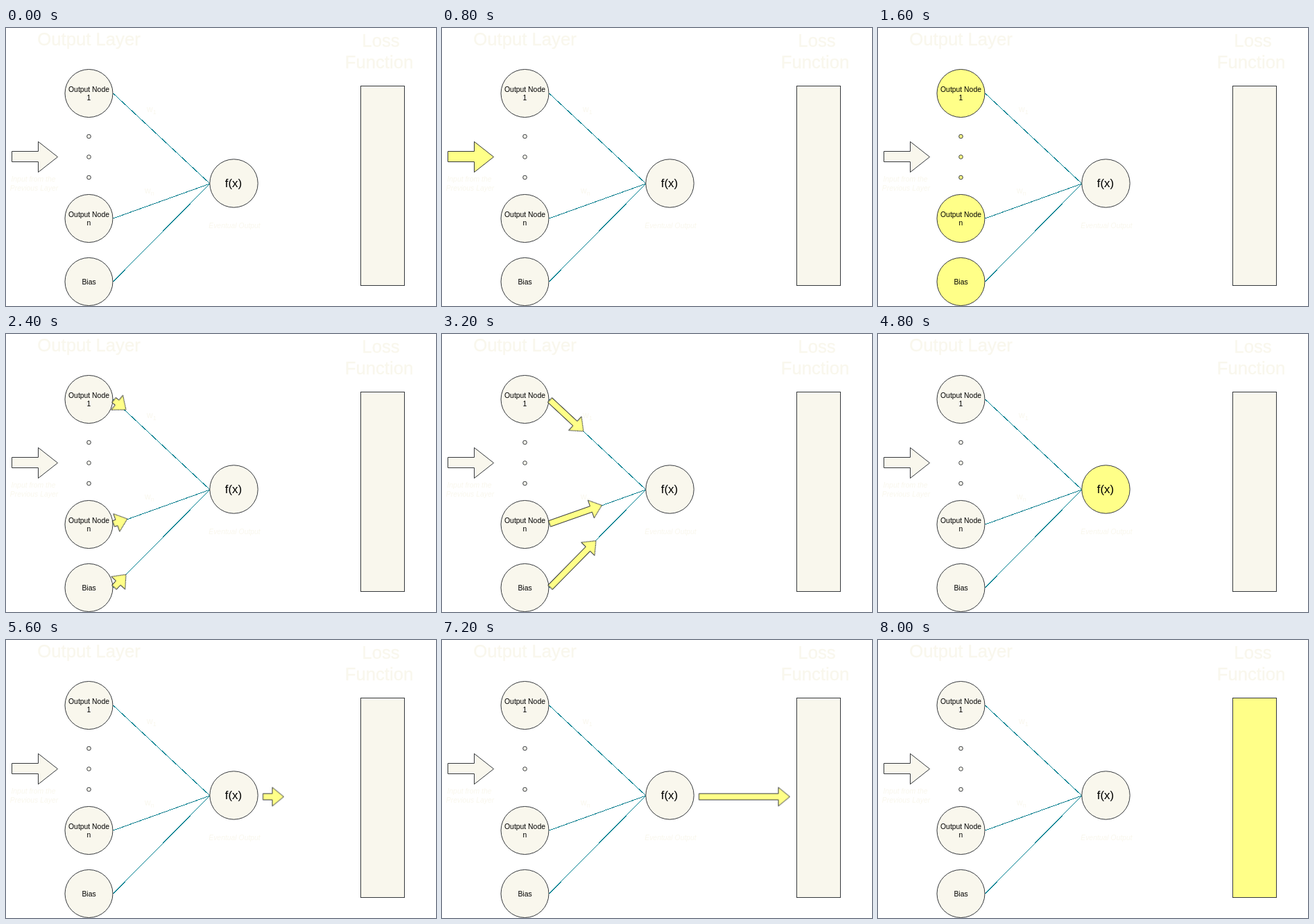
An HTML page that plays this animation: 620x400 px, repeating every 8800 ms.

```html
<!DOCTYPE html>
<html lang="en">
<head>
<meta charset="utf-8">
<title>Forward pass</title>
<style>
  html, body { margin: 0; width: 100%; height: 100%; overflow: hidden; background: #fff; }
  svg { display: block; width: 620px; height: 400px; }
  text { font-family: "Liberation Sans", Arial, sans-serif; font-size: 10.4px; text-anchor: middle; fill: #000; }
  .pale text { fill: #f9f7ed; }
  .pale .title { font-size: 25.7px; stroke: #f9f7ed; stroke-width: .4; }
  .note { font-style: italic; }
  .weight { font-size: 12px; text-anchor: start; }
  .weight tspan { font-size: 9px; }
  .shape { fill: #f9f7ed; stroke: #36393d; }
  .wire { fill: none; stroke: #028090; shape-rendering: crispEdges; }
  .pulse { fill: #ffff88; stroke: #36393d; }

  /* Eleven steps of 800ms; --i is the step in which a part is active */
  .glow, .pulse { animation: 8800ms step-end calc((var(--i) - 11) * 800ms) infinite; }
  .glow { animation-name: glow; }
  .pulse { animation-name: show; }
  @keyframes glow { 0% { fill: #ffff88; } 9.0909%, 100% { fill: #f9f7ed; } }
  @keyframes show { 0% { opacity: 1; } 9.0909%, 100% { opacity: 0; } }
</style>
</head>
<body>
<svg viewBox="0 0 620 400">
  <path class="wire" d="M154.5 94L294 224L154.5 274M294 224L154.5 365"/>

  <path class="shape glow" style="--i:1" d="M8.5 177.5H46.5V163.5L74.5 185.5L46.5 207.5V192.5H8.5Z"/>
  <g class="shape glow" style="--i:2">
    <circle cx="119.5" cy="94" r="34.5"/>
    <circle cx="119.5" cy="156" r="2.8"/>
    <circle cx="119.5" cy="185.5" r="2.8"/>
    <circle cx="119.5" cy="215" r="2.8"/>
    <circle cx="119.5" cy="274" r="34.5"/>
    <circle cx="119.5" cy="365" r="34.5"/>
  </g>
  <circle class="shape glow" style="--i:6" cx="328.5" cy="223.5" r="34.7"/>
  <rect class="shape glow" style="--i:10" x="511.5" y="83.5" width="63" height="287"/>

  <g class="pale">
    <text class="title" x="119.5" y="25">Output Layer</text>
    <text class="title" x="540.5" y="27">Loss</text>
    <text class="title" x="538" y="58">Function</text>
    <text class="note" x="39.5" y="221">Input from the</text>
    <text class="note" x="40.5" y="233.5">Previous Layer</text>
    <text class="note" x="329.5" y="287.5">Eventual Output</text>
    <text class="weight" x="203" y="121">w<tspan dy="3">1</tspan></text>
    <text class="weight" x="200" y="238">w<tspan dy="3">n</tspan></text>
  </g>

  <text x="119.5" y="92">Output Node</text>
  <text x="119.5" y="104">1</text>
  <text x="119.5" y="272">Output Node</text>
  <text x="119.5" y="284">n</text>
  <text x="119.5" y="369">Bias</text>
  <text x="328" y="229" style="font-size:17px">f(x)</text>

  <g id="pulses"></g>
</svg>
<script>
  const HEAD = 16.5, HEAD_HALF = 13.5, SHAFT_HALF = 4.5;
  const layer = document.getElementById('pulses');

  function addArrow(step, x, y, tipX, tipY) {
    const length = Math.hypot(tipX - x, tipY - y);
    const angle = Math.atan2(tipY - y, tipX - x) * 180 / Math.PI;
    const neck = length - HEAD;
    const path = document.createElementNS('http://www.w3.org/2000/svg', 'path');
    path.setAttribute('d', `M0 ${-SHAFT_HALF}H${neck}V${-HEAD_HALF}L${length} 0L${neck} ${HEAD_HALF}V${SHAFT_HALF}H0Z`);
    path.setAttribute('transform', `translate(${x} ${y}) rotate(${angle})`);
    path.setAttribute('class', 'pulse');
    path.style.setProperty('--i', step);
    layer.append(path);
  }

  // Each route: first step, tail, then the tip reached in each step
  const routes = [
    [3, [155.5, 95], [[173, 109], [204, 140], [294, 224]]],
    [3, [155, 273], [[175, 266], [230.5, 246.5], [294, 224]]],
    [3, [156, 364.5], [[173, 346], [222, 297.5], [294, 224]]],
    [7, [370.5, 225.5], [[400.5, 225.5], [443.5, 225.5], [501.5, 225.5]]]
  ];
  for (const [first, tail, tips] of routes)
    tips.forEach((tip, n) => addArrow(first + n, ...tail, ...tip));
</script>
</body>
</html>
```
